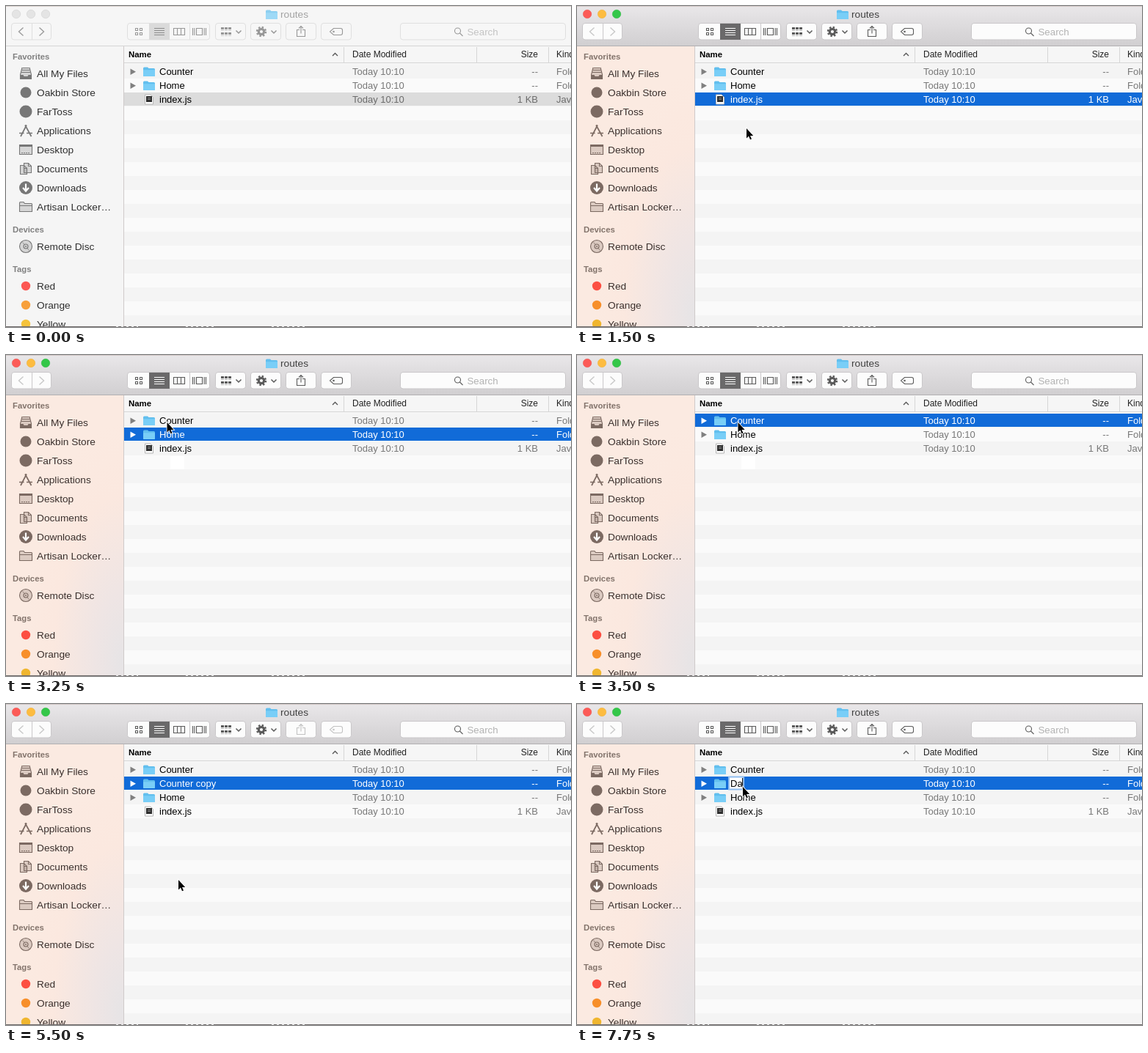
An HTML page for the animation above (8000 ms loop, 770 px wide and 438 px high).

```html
<!DOCTYPE html>
<html lang="en">
<head>
<meta charset="utf-8">
<title>Folder window</title>
<style>
  html, body { margin: 0; width: 100%; height: 100%; overflow: hidden; background: #f6f6f6; }
  svg {
    display: block; width: 100vw; height: 100vh;
    font: 13px "Liberation Sans", Arial, sans-serif;
    --bar: url(#barFill); --edge: #b1afb1; --button: #fcfcfc; --buttonEdge: #c9c7c9;
    --glyph: #5b5b5b; --arrow: #c9c9c9; --title: #404040; --search: #b2b2b2;
    --pressed: #6a696a; --pressedGlyph: #fff;
    --side: url(#sideFill); --sideText: #3a302d; --sideHead: #82736b; --icon: #7c6a62;
    --red: #fc4f42; --orange: #f78f2a; --yellow: #f0b62f;
  }
  svg.off {
    --bar: #f6f6f6; --edge: #d5d5d5; --button: #f7f7f7; --buttonEdge: #dfdfdf;
    --glyph: #989898; --arrow: #9d9d9d; --title: #a2a2a2; --search: #c3c3c3;
    --pressed: #dadada; --pressedGlyph: #8c8c8c;
    --side: #f5f5f5; --sideText: #303030; --sideHead: #808080; --icon: #777;
    --red: #fc5753; --orange: #f7a03c; --yellow: #f5c33b;
  }
  .bar { fill: var(--bar); }
  .edge { fill: var(--edge); }
  .button { fill: var(--button); stroke: var(--buttonEdge); }
  .glyph { fill: none; stroke: var(--glyph); stroke-width: 1.1; }
  .glyph .solid { fill: var(--glyph); stroke: none; }
  .dim .selectionOnly { stroke: #c2c2c2; }
  .off .light { fill: #e4e4e4; stroke: #d0d0d0; }
  .off .titleFolder { opacity: .7; }
  .side { fill: var(--side); }
  .places { font-size: 13.7px; fill: var(--sideText); }
  .heads { font-size: 11.3px; font-weight: bold; fill: var(--sideHead); }
  .icons { fill: none; stroke: var(--icon); stroke-width: 1.1; }
  .icons .solid { fill: var(--icon); stroke: none; }
  .icons .tint { fill: var(--icon); fill-opacity: .25; }
  .header { font-size: 12px; fill: #222; }
  .meta { fill: #787878; }
  .selected text { fill: #fff; }
  .off .selected .name { fill: #000; }
  .off .selected .meta { fill: #6c6c6c; }
  .selected .highlight { fill: #116bd8; }
  .off .selected .highlight { fill: #dcdcdc; }
  .triangle { fill: #808080; }
  .selected .triangle { fill: #fff; }
  .selected .editing { fill: #000; }
</style>
</head>
<body>
<svg id="stage" viewBox="0 0 770 438">
  <defs>
    <linearGradient id="barFill" x2="0" y2="1">
      <stop stop-color="#e9e7e9"/><stop offset="1" stop-color="#d1cfd1"/>
    </linearGradient>
    <radialGradient id="sideFill" cx="1" cy=".95" r=".85">
      <stop stop-color="#e6e4e6"/><stop offset=".3" stop-color="#efe5e4"/>
      <stop offset=".7" stop-color="#fbe8df"/><stop offset="1" stop-color="#fbeae1"/>
    </radialGradient>
    <g id="folder">
      <path d="M0 2q0-1.5 1.5-1.5H6L7.5 2H14.5q1.5 0 1.5 1.5V12q0 1-1 1H1q-1 0-1-1Z" fill="#62bfee"/>
      <path d="M0 4.2H16V12q0 1-1 1H1q-1 0-1-1Z" fill="#79cef7"/>
    </g>
    <g id="script">
      <path d="M.5.5H8L11.5 4V13.5H.5Z" fill="#fff" stroke="#b5b5b5"/>
      <rect x="2" y="2.5" width="8" height="8" fill="#2e2e2e"/>
      <path d="M4 5h4M4 7h4" stroke="#888"/>
    </g>
  </defs>

  <rect class="bar" width="770" height="54"/>
  <rect class="edge" y="54" width="770" height="1"/>
  <g stroke-width=".6">
    <circle class="light" cx="14" cy="11" r="5.7" fill="#fc5b57" stroke="#ee5450"/>
    <circle class="light" cx="34" cy="11" r="5.7" fill="#fdbc40" stroke="#eeb03b"/>
    <circle class="light" cx="54" cy="11" r="5.7" fill="#34c749" stroke="#2dba40"/>
  </g>
  <use class="titleFolder" href="#folder" x="354" y="5"/>
  <text x="374" y="16" font-size="13.7" style="fill:var(--title)">routes</text>

  <g id="buttons" class="button"></g>
  <rect x="195" y="24" width="28" height="22" style="fill:var(--pressed)"/>
  <path d="M35.5 24v22M250.5 24v22" style="stroke:var(--buttonEdge)"/>
  <g fill="none" stroke-width="1.4" style="stroke:var(--arrow)">
    <path d="M23.5 29.5l-6 5.500 6 5.500M45.5 29.5l6 5.500-6 5.500"/>
  </g>
  <path d="M202 30.5h14M202 33.5h14M202 36.5h14M202 39.5h14" style="stroke:var(--pressedGlyph)"/>
  <g class="glyph">
    <path d="M176.500 30.500h3v3h-3zM182.500 30.500h3v3h-3zM176.500 36.500h3v3h-3zM182.500 36.500h3v3h-3z"/>
    <path d="M228.500 30.500h15v9h-15zM233.500 30.500v9M238.500 30.500v9"/>
    <path d="M259.500 30.500h8v9h-8zM254.500 30v10M256.800 30v10M270.200 30v10M272.500 30v10"/>
    <path class="solid" d="M293 29h4v3h-4zM298 29h4v3h-4zM303 29h4v3h-4zM293 36h4v3h-4zM298 36h4v3h-4zM303 36h4v3h-4z"/>
    <path d="M293 33.500h14M293 40.500h14" stroke-dasharray="4 1" opacity=".45"/>
    <path d="M313.500 33.500l3.500 3.500 3.500-3.500M361.500 33.500l3.500 3.500 3.500-3.500" stroke-width="1.500"/>
    <circle cx="348" cy="35" r="3.700" stroke-width="3.200"/>
    <circle cx="348" cy="35" r="6" stroke-width="2.400" stroke-dasharray="2.350 2.362"/>
  </g>
  <g id="selectionTools">
    <g class="glyph selectionOnly">
      <path d="M400 32.500h-3.500v9h11v-9H404M402 37.500V27.500M399 30.500l3-3 3 3"/>
      <path d="M446.500 30.500H456q2.500 0 2.500 2.500v4q0 2.500-2.500 2.500H446.500L441.500 35Z"/>
      <circle cx="446.500" cy="35" r=".8"/>
    </g>
  </g>
  <g class="glyph">
    <circle cx="615.500" cy="34" r="4"/><path d="M618.500 37l4 4"/>
  </g>
  <text x="628.500" y="40" font-size="13.300" style="fill:var(--search)">Search</text>

  <rect class="side" y="55" width="160" height="383"/>
  <rect x="160" y="55" width="1" height="383" fill="#cfcaca"/>
  <g class="icons">
    <path d="M22.500 84.500h9M21.500 87.500h11M21 90.500h12"/>
    <path class="tint" d="M22 84L19.500 93.500v6h15v-6L32 84"/>
    <path class="solid" d="M19 94h4.500l1 2h5l1-2H35v6H19z"/>
    <circle class="solid" cx="27" cy="118" r="7.500"/>
    <circle class="solid" cx="27" cy="144" r="8.500"/>
    <path d="M20 178L28 162.500M26 162.500L34.500 178M18 173.500h6.500M28 173.500h8" stroke-width="1.700"/>
    <path class="tint" d="M18.500 189.500h17v13h-17z"/><path class="solid" d="M18 189h18v3H18z"/>
    <path d="M21 200.500h12" stroke-dasharray="2 1"/>
    <path class="tint" d="M24.500 214.500h6l4 4v9h-10zM30.500 214.500v4h4"/>
    <path class="tint" d="M19.500 217.500h5l4 4v8h-9zM24.500 217.500v4h4"/>
    <circle class="solid" cx="27" cy="248" r="9"/>
    <path class="tint" d="M18.500 268.500q0-1 1-1h4.500l1.500 2h9q1 0 1 1v10h-17zM18.500 272.500h17"/>
    <circle class="tint" cx="27" cy="328" r="8.500"/><circle cx="27" cy="328" r="3"/>
    <circle class="solid" cx="27" cy="328" r="1"/>
    <path d="M22.500 322.500l2.500 3M29 330.500l2.500 3" opacity=".6"/>
  </g>
  <path d="M27 242.500v8M23 248l4 4.500 4-4.500" fill="none" stroke="#fff" stroke-width="2.200"/>
  <circle cx="27" cy="382" r="6.200" style="fill:var(--red)"/>
  <circle cx="27" cy="408" r="6.200" style="fill:var(--orange)"/>
  <circle cx="27" cy="434" r="6.200" style="fill:var(--yellow)"/>
  <g id="places" class="places"></g>
  <g class="heads">
    <text x="9" y="73">Favorites</text><text x="9" y="309">Devices</text><text x="9" y="363">Tags</text>
  </g>

  <rect x="161" y="55" width="609" height="24" fill="#f6f6f6"/>
  <path d="M161 77.500h609M460.500 56v21M641.500 56v21M739.500 56v21" stroke="#d6d6d6"/>
  <g class="header">
    <text x="167" y="70" font-size="11.400" font-weight="bold" fill="#000">Name</text>
    <text x="472" y="70">Date Modified</text>
    <text x="725" y="70" text-anchor="end">Size</text>
    <text x="750" y="70">Kind</text>
  </g>
  <path d="M445 68l3.500-3.500 3.500 3.500" fill="none" stroke="#555" stroke-width="1.300"/>

  <g id="stripes"></g>
  <rect id="patch" width="19" height="18" fill="#fff"/>
  <g id="rows"></g>

  <path d="M0 .25h770" stroke="#a89088" stroke-width=".5"/>
  <path d="M0 437.500h770" stroke="#6e6a6a"/>
  <path d="M150 437.500h30M245 437.500h42M362 437.500h48" stroke="#ddd" stroke-dasharray="3 4"/>
  <path id="pointer" d="M0-1v13.500l3-2.900 2 4.700 2-.9-2-4.500h4.200z"
        stroke="#fff" stroke-width="1.600" paint-order="stroke"/>
</svg>
<script>
const $ = id => document.getElementById(id);
const LOOP = 8000;
const ROW = 19, LIST_TOP = 80;

$('buttons').innerHTML = [[8, 53], [166, 111], [286, 40], [334, 40], [382, 40], [430, 40], [538, 224]]
  .map(([x, w]) => `<rect x="${x - .5}" y="23.5" width="${w + 1}" height="22.5" rx="3.5"/>`).join('');

const favorites = ['All My Files', 'Oakbin Store', 'FarToss', 'Applications', 'Desktop',
  'Documents', 'Downloads', 'Artisan Locker…'];
const label = (text, y) => `<text x="42" y="${y}">${text}</text>`;
$('places').innerHTML = favorites.map((text, i) => label(text, 97 + 26 * i)).join('') +
  label('Remote Disc', 333) +
  ['Red', 'Orange', 'Yellow'].map((text, i) => label(text, 387 + 26 * i)).join('');

$('stripes').innerHTML = Array.from({ length: 19 }, (_, i) =>
  `<rect x="161" y="${LIST_TOP + ROW * i}" width="609" height="${ROW}" fill="${i % 2 ? '#fafafa' : '#f4f4f4'}"/>`).join('');

// Each step lists only what changes at that time.
const plain = ['Counter', 'Home', 'index.js'];
const copied = name => ['Counter', name, 'Home', 'index.js'];
const steps = [
  [0, { active: false, files: plain, selected: 2, pointer: null, patch: null, tools: true, edit: null }],
  [500, { pointer: [395, 218] }],
  [750, { pointer: [233, 211] }],
  [1000, { pointer: [240, 171] }],
  [1250, { pointer: [231, 168] }],
  [1500, { active: true }],
  [1750, { selected: -1, pointer: [231, 150] }],
  [2000, { tools: false }],
  [2250, { pointer: [225, 124] }],
  [2250, { patch: [224, 138] }],
  [2500, { pointer: [219, 118] }],
  [2750, { selected: 1, tools: true }],
  [3250, { pointer: [219.5, 93] }],
  [3500, { selected: 0 }],
  [4500, { pointer: [235, 241] }],
  [4750, { selected: -1, tools: false, patch: null }],
  [5500, { files: copied('Counter copy'), selected: 1 }],
  [5750, { pointer: [233, 194], tools: true }],
  [6000, { pointer: [229, 149], patch: [226, 175] }],
  [6250, { pointer: [226, 124] }],
  [6500, { pointer: [226, 114] }],
  [7250, { edit: 'all' }],
  [7500, { edit: 'caret', files: copied('D'), patch: null }],
  [7750, { files: copied('Da') }],
];
let merged = {};
const states = steps.map(([at, change]) => ({ at, ...(merged = { ...merged, ...change }) }));

const pen = document.createElement('canvas').getContext('2d');
pen.font = '13px "Liberation Sans", Arial, sans-serif';

function editField(text, y, mode) {
  const width = pen.measureText(text).width;
  const mark = mode === 'all'
    ? `<rect x="209" y="${y + 2}" width="${width}" height="15" fill="#b3d7fe"/>`
    : `<rect x="${209 + width - .5}" y="${y + 2}" width="1" height="15"/>`;
  return `<rect x="207" y="${y + .5}" width="${width + 3.5}" height="17" fill="#fff" stroke="#8fbdf0" stroke-width="2"/>${mark}`;
}

function fileRow(name, i, state) {
  const y = LIST_TOP + ROW * i;
  const base = y + 14;
  const isScript = name.endsWith('.js');
  const selected = state.selected === i;
  const editing = selected && state.edit;
  const icon = isScript
    ? `<use href="#script" x="189" y="${y + 2.5}"/>`
    : `<path class="triangle" d="M169.5 ${y + 5.5}v8.5l7.5-4.25z"/><use href="#folder" x="187" y="${y + 3}"/>`;
  return `<g class="${selected ? 'selected' : ''}">
    ${selected ? `<rect class="highlight" x="161" y="${y}" width="609" height="18"/>` : ''}
    ${icon}${editing ? editField(name, y, state.edit) : ''}
    <text class="name ${editing ? 'editing' : ''}" x="209" y="${base}">${name}</text>
    <text class="meta" x="472" y="${base}">Today 10:10</text>
    <text class="meta" x="725" y="${base}" text-anchor="end">${isScript ? '1 KB' : '--'}</text>
    <text class="meta" x="750" y="${base}">${isScript ? 'JavaScript' : 'Folder'}</text></g>`;
}

function place(node, point) {
  node.style.display = point ? '' : 'none';
  if (point) node.setAttribute('transform', `translate(${point})`);
}

function show(state) {
  $('stage').classList.toggle('off', !state.active);
  $('selectionTools').classList.toggle('dim', !state.tools);
  $('rows').innerHTML = state.files.map((name, i) => fileRow(name, i, state)).join('');
  place($('pointer'), state.pointer);
  place($('patch'), state.patch);
}

let shown;
function tick() {
  const time = performance.now() % LOOP;
  const state = states.findLast(step => step.at <= time);
  if (state !== shown) show(shown = state);
  requestAnimationFrame(tick);
}
tick();
</script>
</body>
</html>
```
